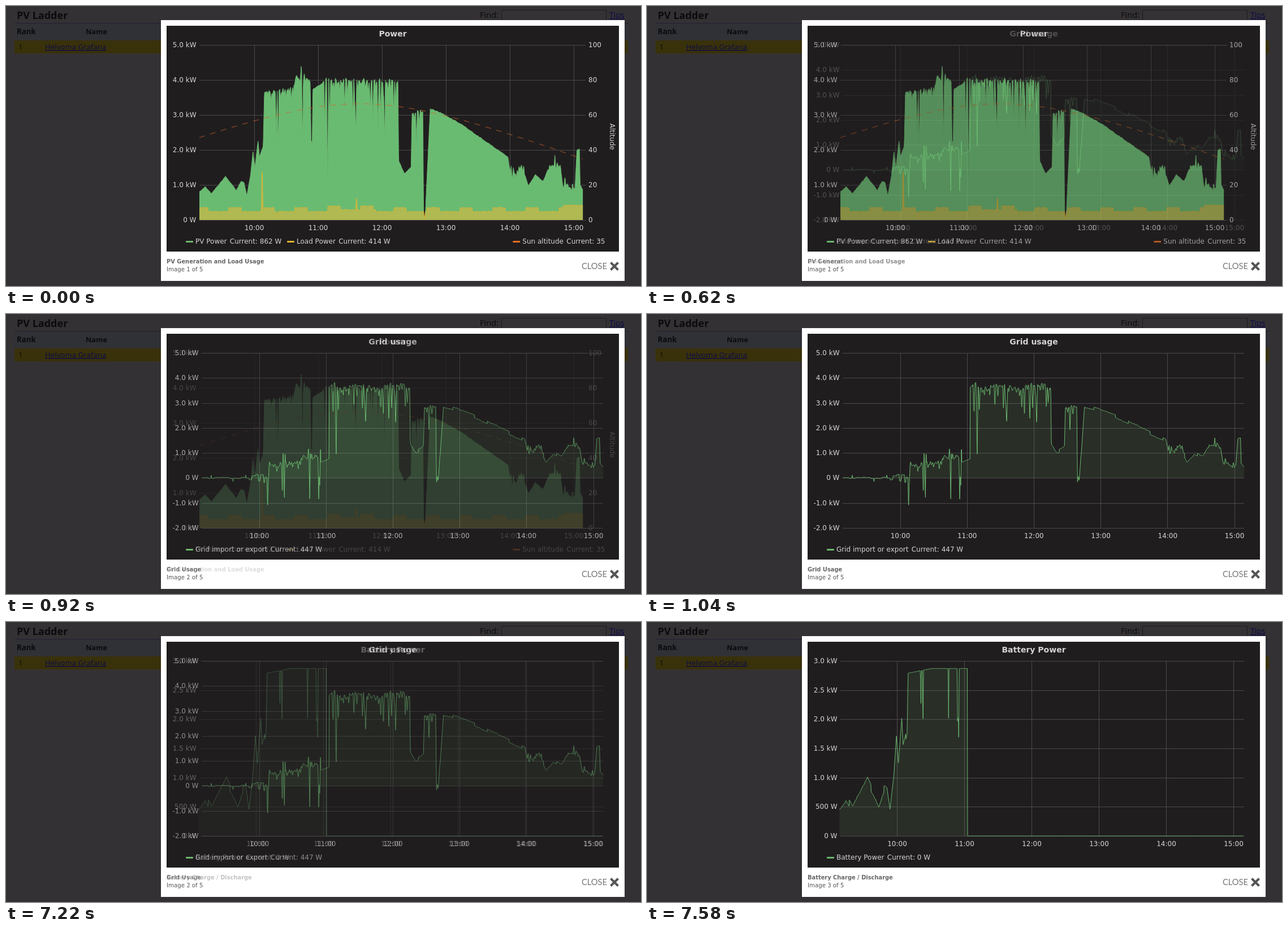
Recreate the animation shown at these times as an HTML page. Size 1123x496 px, loop 8 s.

```html
<!DOCTYPE html>
<html lang="en">
<head>
<meta charset="utf-8">
<title>PV Ladder</title>
<style>
  html, body { margin: 0; width: 100%; height: 100%; overflow: hidden; background: #343134; }
  svg { display: block; width: 1123px; height: 496px; }
  .page { font: 13.3px "Open Sans", "Noto Sans", sans-serif; fill: #0b0a0c; }
  .page .link { fill: #0b0a48; text-decoration: underline; }
  .chart { font: 12px "DejaVu Sans", sans-serif; fill: #d4d3d4; }
  .title { font-size: 14px; font-weight: bold; }
  .caption { font: bold 9.9px "DejaVu Sans", sans-serif; fill: #666; }
  .count { font: 10.2px "DejaVu Sans", sans-serif; fill: #555; }
  .close { font: 14.7px Lato, sans-serif; fill: #777; }
  .grid { stroke: #4b494b; fill: none; shape-rendering: crispEdges; }
  .line { fill: none; stroke-width: 1; stroke-linejoin: round; }
</style>
</head>
<body>
<svg viewBox="0 0 1123 496">
  <g class="page">
    <rect x="15" y="31" width="1085" height="28" fill="#303136"/>
    <rect x="15" y="30" width="1085" height="1" fill="#202130"/>
    <rect x="15" y="61" width="1085" height="23" fill="#39310a"/>
    <text x="19" y="23" font-size="18" font-weight="bold">PV Ladder</text>
    <text x="838" y="21" font-size="14.6">Find:</text>
    <rect x="876.5" y="7.5" width="185" height="23" fill="#353235" stroke="#1d1b1e"/>
    <text class="link" x="1067" y="21" font-size="14">Tips</text>
    <text x="19" y="50" font-weight="bold">Rank</text>
    <text x="141" y="50" font-size="12.7" font-weight="bold">Name</text>
    <text x="22" y="77">1</text>
    <text class="link" x="69" y="77">Helvoma Grafana</text>
  </g>
  <rect x="274" y="25" width="820" height="462" fill="#fff"/>
  <g id="slides"></g>
  <text class="close" x="1018" y="466">CLOSE</text>
  <path d="M1069.5 454.5l13 13m0 -13l-13 13" stroke="#555" stroke-width="4" fill="none"/>
</svg>
<script>
const GREEN = '#6ab86e', YELLOW = '#e0b52f', ORANGE = '#d3662a';
const FAINT = 'rgba(115,191,105,0.1)';
const LOOP = 8000, STEP = 60;
const DAWN = 9.142, DUSK = 15.143;   // hours shown
const LAG = 0.008;                   // battery reaction time in hours

// Key points of the panel output: hour, kW.
const outline = [
  [9.14, .8], [9.23, .95], [9.33, .76], [9.55, 1.24], [9.72, .85], [9.79, 1.1], [9.84, 1.07], [9.885, .7],
  [9.94, 1.25], [9.98, 1.95], [10.01, 1.47], [10.06, 2.28], [10.08, 1.8], [10.14, 2.1], [10.16, 3.65],
  [10.6, 3.72], [10.66, 4.05], [10.86, 4], [10.92, 3.75], [11.05, 3.88], [11.12, 4], [12.25, 3.97],
  [12.26, 1.7], [12.35, 1.33], [12.455, 1.5], [12.47, 3.05], [12.64, 3.1], [12.65, .08], [12.675, .08],
  [12.755, 3.18], [12.9, 3.08], [13.22, 2.76], [13.97, 1.8], [14.02, 1.15], [14.2, 1.5], [14.29, .97],
  [14.4, 1.3], [14.52, 1.1], [14.6, 1.45], [14.79, 1.55], [14.83, .95], [15.02, .9], [15.05, 2],
  [15.09, 2.03], [15.1, 1], [15.144, .86]];

// Broken cloud: from, to, largest swing in kW.
const clouds = [[10.2, 10.62, -.4], [10.62, 10.86, .4], [11.07, 12.24, -1.5], [12.48, 12.63, -1],
  [14, 14.25, .6], [14.6, 14.8, .7], [14.84, 15, .25]];
const gusts = [[10.345, -1.35], [10.375, -1.5], [10.755, -1.7], [10.89, -1.9], [10.905, -1.9],
  [11.15, -2.4], [11.59, -1.6], [12.04, -1.7]];
const kettle = [[10.124, 1.15], [10.36, -.2], [11.6, .35], [12.665, -.25]];

function random(n) {
  const s = Math.sin(n * 127.1 + 11.7) * 43758.5453;
  return s - Math.floor(s);
}

function jitter(t) {
  const i = Math.floor(t * 60), f = t * 60 - i;
  return (random(i) * (1 - f) + random(i + 1) * f) * 2 - 1;
}

function lerpAt(points, t) {
  const i = Math.max(1, points.findIndex(p => p[0] >= t));
  const [[t0, a], [t1, b]] = [points[i - 1], points[i]];
  return a + (b - a) * Math.min(1, Math.max(0, (t - t0) / (t1 - t0)));
}

const peak = (t, at, width = 0.013) => Math.max(0, 1 - Math.abs(t - at) / width);
const peaks = (list, t) => list.reduce((sum, [at, v]) => sum + v * peak(t, at), 0);

function cloud(t) {
  const zone = clouds.find(([from, to]) => t >= from && t <= to);
  if (!zone) return jitter(t) * 0.012;
  const slot = Math.floor(t / 0.04);
  const at = (slot + 0.35 + 0.3 * random(slot)) * 0.04;
  return zone[2] * random(slot + 500) ** 2 * peak(t, at) + jitter(t) * 0.09;
}

const panels = t => Math.max(0, lerpAt(outline, t) + cloud(t) + peaks(gusts, t));

// The fridge switches on about every half hour.
function fridge(t) {
  if (t > 14.84) return 0.42;
  const phase = (t + 1.255) / 0.517 % 1;
  return 0.24 + (phase < 0.37 ? 0.11 : 0) + (t > 11.15 && t < 11.9 ? 0.05 : 0);
}

const load = t => Math.max(0, fridge(t) + peaks(kettle, t) + jitter(t + 40) * 0.012);

// The battery takes all surplus up to its limit until it is full.
function battery(t) {
  if (t > 11.045) return 0;
  const limit = 2.79 + 0.08 * Math.min(1, (t - 10.16) / 0.35);
  return Math.min(limit, panels(t - LAG) - fridge(t - LAG));
}

const exported = t => panels(t) - load(t) - battery(t);

function sun(t) {
  const turn = (t - 11.65) * Math.PI / 12;
  return Math.asin(0.032 + 0.884 * Math.cos(turn)) * 180 / Math.PI;
}

const text = (x, y, s, attrs = '') => `<text x="${x}" y="${y}" ${attrs}>${s}</text>`;

function legend(x, color, name, value) {
  return `<rect x="${x}" y="416" width="13" height="3" rx="1" fill="${color}"/>` +
    text(x + 17, 421, `${name}<tspan dx="5.3">Current: ${value}</tspan>`);
}

// ten: x of 10:00, hour: px per hour, top and bottom: values at the plot edges.
function chart({ left, right, ten, hour, top, bottom, step }) {
  const yOf = v => 379 - (v - bottom) * 310 / (top - bottom);
  const label = v => v && Math.abs(v) < 1 ? v * 1000 + ' W' : v ? v.toFixed(1) + ' kW' : '0 W';

  function curve(fn, scale = 1) {
    const pts = [], n = 1440;
    for (let i = 0; i <= n; i++) {
      const t = DAWN + (DUSK - DAWN) * i / n;
      pts.push((ten + (t - 10) * hour).toFixed(1) + ' ' + yOf(fn(t) * scale).toFixed(1));
    }
    return 'M' + pts.join('L');
  }

  function area(fn, stroke, fill) {
    const d = curve(fn), x = t => ten + (t - 10) * hour;
    return `<path d="${d}L${x(DUSK)} ${yOf(0)}L${x(DAWN)} ${yOf(0)}Z" fill="${fill}"/>` +
      `<path class="line" d="${d}" stroke="${stroke}"/>`;
  }

  function axes() {
    let lines = '', labels = '';
    for (let v = top; v >= bottom; v -= step) {
      const y = Math.round(yOf(v));
      lines += `M${left} ${y + 0.5}H${right}`;
      labels += text(left - 5.5, y + 4, label(v), 'text-anchor="end"');
    }
    for (let h = 0; h < 6; h++) {
      const x = ten + h * hour;
      lines += `M${Math.floor(x) + 0.5} 69V379`;
      labels += text(x, 397, 10 + h + ':00', 'text-anchor="middle"');
    }
    return `<path class="grid" d="${lines}"/>` + labels;
  }

  return { curve, area, axes };
}

function slide(n, title, caption, body) {
  return `<g><rect x="284" y="35" width="800" height="400" fill="#201d1f"/>
    <rect x="284" y="440" width="300" height="40" fill="#fff"/>
    <g class="chart">${body}${text(684, 54, title, 'class="title" text-anchor="middle"')}</g>
    ${text(284, 456, caption, 'class="caption"')}
    ${text(284, 470, `Image ${n} of 5`, 'class="count"')}</g>`;
}

const day = chart({ left: 342, right: 1025, ten: 439, hour: 113, top: 5, bottom: 0, step: 1 });
const net = chart({ left: 346, right: 1056, ten: 448, hour: 118.2, top: 5, bottom: -2, step: 1 });
const store = chart({ left: 342, right: 1056, ten: 442.5, hour: 119, top: 3, bottom: 0, step: 0.5 });

const power = day.axes() +
  [100, 80, 60, 40, 20, 0].map((v, i) => text(1030, 73 + i * 62, v)).join('') +
  text(0, 0, 'Altitude', 'transform="translate(1068 208) rotate(90)"') +
  day.area(panels, GREEN, '#6abb72') +
  day.area(load, YELLOW, 'rgba(234,184,57,0.55)') +
  `<path class="line" d="${day.curve(sun, 5 / 100)}" stroke="${ORANGE}" stroke-dasharray="10 10"/>` +
  legend(318, GREEN, 'PV Power', '862 W') +
  legend(497, YELLOW, 'Load Power', '414 W') +
  legend(896.3, '#e8701f', 'Sun altitude', '35');

const usage = net.axes() + net.area(exported, GREEN, FAINT) +
  legend(318, GREEN, 'Grid import or export', '447 W');

const charge = store.axes() + store.area(battery, GREEN, FAINT) +
  legend(318, GREEN, 'Battery Power', '0 W');

const slides = document.getElementById('slides');
slides.innerHTML =
  slide(1, 'Power', 'PV Generation and Load Usage', power) +
  slide(2, 'Grid usage', 'Grid Usage', usage) +
  slide(3, 'Battery Power', 'Battery Charge / Discharge', charge);

// Ten steps of linear cross-fade, the last one complete.
function fade(t, start) {
  const n = Math.floor((t - start) / STEP);
  return n < 0 ? 0 : n >= 9 ? 1 : 0.08 + n * 0.1;
}

const begin = performance.now();
function draw() {
  const t = Math.max(0, performance.now() - begin) % LOOP;
  slides.children[1].setAttribute('opacity', fade(t, 500));
  slides.children[2].setAttribute('opacity', fade(t, 7040));
  requestAnimationFrame(draw);
}
draw();
</script>
</body>
</html>
```
